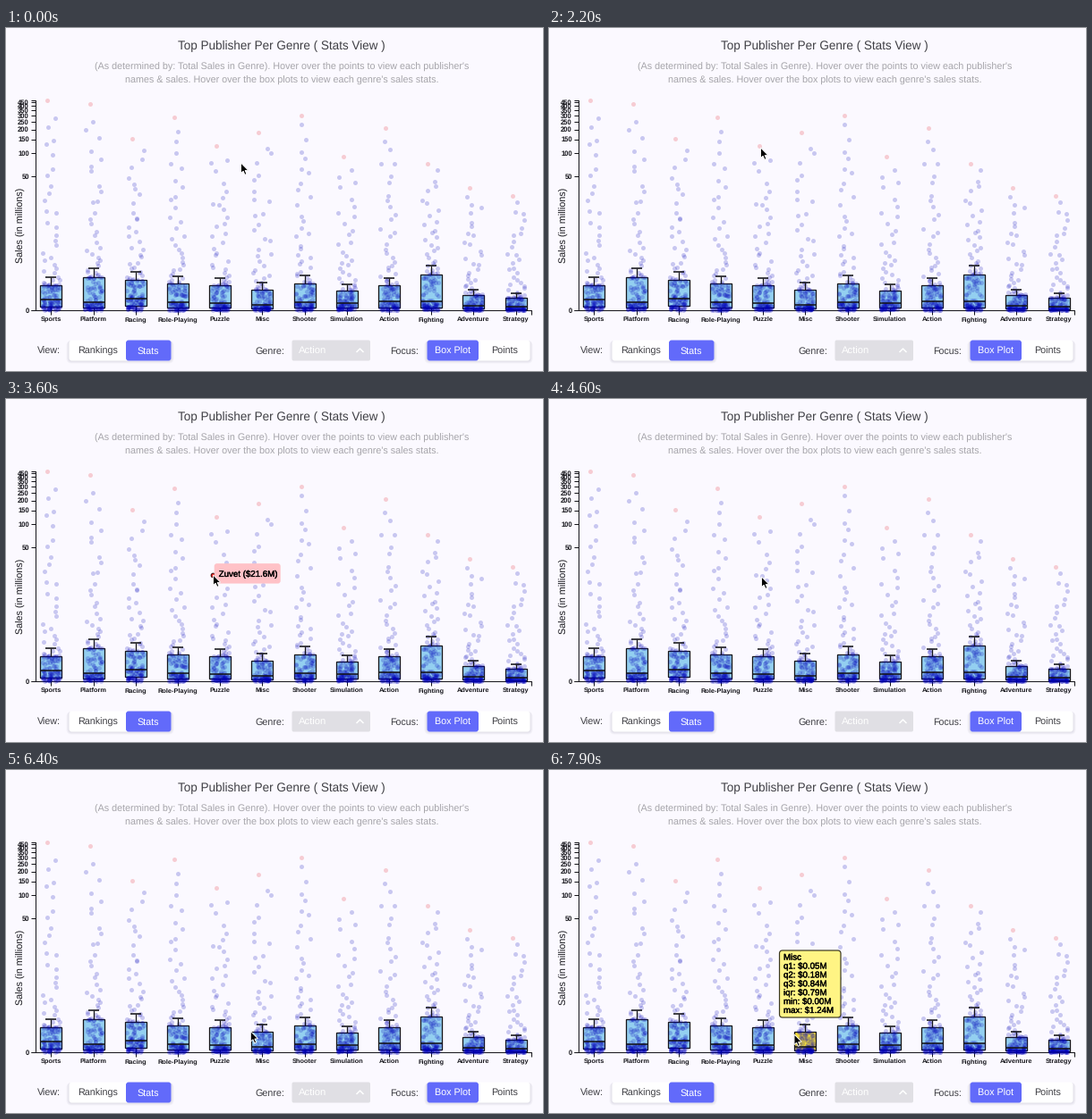
These frames come from a looping animation (600x384 px, 8 s). A matplotlib script:

```python
import numpy as np
import matplotlib.pyplot as plt
from matplotlib.animation import FuncAnimation
from matplotlib.patches import FancyBboxPatch, Polygon, Rectangle
from matplotlib.patheffects import Normal, Stroke

W, H, DPI = 600, 384, 100
PX = 72 / DPI
STEP, FRAMES = 100, 80
BG, INK, DARK = "#fbf9ff", "#3f3f44", "#15151a"
ACCENT, SKY, YELLOW = "#626afa", "#93cff0", "#f2dc3c"
AXIS_X, AXIS_Y = 32.5, 315.5

plt.rcParams.update({"font.family": "Liberation Sans", "text.hinting": "none"})
fig = plt.figure(figsize=(W / DPI, H / DPI), dpi=DPI, facecolor=BG)
ax = fig.add_axes([0, 0, 1, 1])
ax.set(xlim=(0, W), ylim=(H, 0))
ax.axis("off")


def text(x, y, s, size=10.75, color=INK, ha="left", medium=False, **kw):
    t = ax.text(x, y, s, fontsize=size * PX, color=color, ha=ha,
                va=kw.pop("va", "baseline"), **kw)
    if medium:
        t.set_path_effects([Stroke(linewidth=0.25, foreground=color), Normal()])
    return t


def panel(x0, y0, x1, y1, color, r=3, edge="none", lw=0.0, **kw):
    style = f"round,pad=0,rounding_size={r}"
    return ax.add_patch(FancyBboxPatch((x0, y0), x1 - x0, y1 - y0, boxstyle=style,
                                       fc=color, ec=edge, lw=lw * PX, **kw))


def line(xs, ys, color=DARK, lw=1.0, z=2):
    ax.plot(xs, ys, color=color, lw=lw * PX, zorder=z, solid_capstyle="butt")


def dots(xs, ys, rgb):
    ax.scatter(xs, ys, s=(5 * PX) ** 2, fc=(*rgb, 0.2), lw=0, zorder=5)


def y_of(sales):
    return 316 - 38.15 * np.log1p(sales)


# Sales in millions: median, third quartile, leading publisher
GENRES = {
    "Sports": (0.37, 1.11, 472), "Platform": (0.27, 1.64, 425),
    "Racing": (0.42, 1.41, 152), "Role-Playing": (0.28, 1.17, 287),
    "Puzzle": (0.23, 1.06, 124.9), "Misc": (0.18, 0.84, 183),
    "Shooter": (0.25, 1.20, 302), "Simulation": (0.23, 0.80, 90),
    "Action": (0.30, 1.08, 209), "Fighting": (0.30, 1.85, 72.6),
    "Adventure": (0.14, 0.58, 35.7), "Strategy": (0.125, 0.44, 27.3),
}
PER_QUARTER = 32
BLUE, RED = (0, 0, 0.72), (0.9, 0.1, 0.15)


def draw_header():
    text(308, 24.5, "Top Publisher Per Genre ( Stats View )", 13.55, ha="center")
    text(308, 46.6, "(As determined by: Total Sales in Genre). Hover over the points "
         "to view each publisher's", 10.7, "#a6a5aa", "center")
    text(308, 61.6, "names & sales. Hover over the box plots to view each genre's "
         "sales stats.", 10.7, "#a6a5aa", "center")


def draw_axes():
    left = AXIS_X - 5
    line([left, AXIS_X, AXIS_X, left], [80.5, 80.5, AXIS_Y, AXIS_Y])
    line([AXIS_X, 587, 587], [AXIS_Y, AXIS_Y, AXIS_Y + 5])
    for sales in range(0, 451, 50):
        y = y_of(sales)
        line([left, AXIS_X], [y, y])
        text(left - 1.7, y + 2.7, str(sales), 7.6, DARK, "right", weight="bold")
    text(17, 221, "Sales (in millions)", 10.7, DARK, "center", rotation=90, va="center")


def draw_box(cx, median, q3):
    """Quartile box; the whisker reaches half an IQR above it."""
    q1 = 0.3 * median
    top, hi, mid, lo = y_of(np.array([1.5 * q3 - 0.5 * q1, q3, median, q1]))
    line([cx, cx], [top, hi], lw=1.3, z=5.5)
    line([cx, cx], [lo, 316], lw=1.3)
    line([cx - 6, cx + 6], [top, top], lw=1.6, z=5.5)
    line([cx - 12, cx + 12], [mid, mid], lw=1.6, z=5.5)
    box = ax.add_patch(Rectangle((cx - 12, hi), 24, lo - hi, fc=SKY, ec=DARK,
                                 lw=1.3 * PX, zorder=3))
    return box, (hi, mid, lo, 316)


def draw_genres():
    rng = np.random.default_rng(11)
    boxes = {}
    for i, (name, (median, q3, lead)) in enumerate(GENRES.items()):
        cx = 50.3 + 47.2 * i
        line([cx, cx], [AXIS_Y, AXIS_Y + 5])
        text(cx, 328.3, name, 7.4, DARK, "center", weight="bold")
        boxes[name], rows = draw_box(cx, median, q3)

        # A quarter of the points per quartile, thinning out towards the leader
        u = (np.arange(PER_QUARTER) + rng.random(PER_QUARTER)) / PER_QUARTER
        ys = [rows[0] - (rows[0] - y_of(lead)) * 0.95 * u ** 2.1]
        ys += [rng.uniform(a, b, PER_QUARTER) for a, b in zip(rows, rows[1:])]
        dots(cx + rng.uniform(-10, 10, 4 * PER_QUARTER), np.concatenate(ys), BLUE)
        dots([cx - 4], [y_of(lead)], RED)
    return boxes


def toggle(x0, x1, split, left, right, left_on):
    for d in (1, 2, 3):
        panel(x0 - d, 350, x1 + d, 372.5 + d, (0.2, 0.2, 0.3, 0.04), 3 + d)
    panel(x0, 349.5, x1, 372.5, "white")
    a, b = (x0, split) if left_on else (split, x1)
    panel(a, 349.5, b, 372.5, ACCENT)
    for s, u, v, on in ((left, x0, split, left_on), (right, split, x1, not left_on)):
        text((u + v) / 2, 364.8, s, color="white" if on else INK, ha="center")


def draw_controls():
    text(34.5, 365, "View:")
    toggle(70.5, 184.5, 134, "Rankings", "Stats", False)
    text(278, 365, "Genre:")
    panel(319.5, 349.5, 407, 372.5, "#e0dfe4", 2)
    text(327, 364.8, "Action", 11.2, "white")
    line([391.5, 395.5, 399.5], [363, 359, 363], "white", 1.5)
    text(429, 365, "Focus:", 10.6)
    toggle(470.5, 585.5, 528, "Box Plot", "Points", True)


def point_tip(x, y, width, label):
    dot, = ax.plot([x], [y], "o", ms=4.8 * PX, mfc="#e8201c", mec="#2a0808",
                   mew=0.9 * PX, zorder=6)
    left, top = x + 1.7, y - 12.9
    back = panel(left, top, left + width, top + 22.4, "#ffc2c7", 3, zorder=7)
    words = text(left + 5, top + 14.8, label, 9.7, "black", medium=True, zorder=8)
    return [dot, back, words]


def box_tip():
    rows = ["Misc", "q1: $0.05M", "q2: $0.18M", "q3: $0.84M",
            "iqr: $0.79M", "min: $0.00M", "max: $1.24M"]
    back = panel(257.5, 202, 326, 277, "#fff484", 3.5, "#3a3720", 1.2, zorder=7)
    return [back] + [text(262, 212.6 + 9.9 * i, s, 9.7, "black", medium=True, zorder=8)
                     for i, s in enumerate(rows)]


draw_header()
draw_axes()
boxes = draw_genres()
draw_controls()

LEADER, RUNNER_UP = (235.1, y_of(124.9)), (231, y_of(21.6))
dots(*RUNNER_UP, BLUE)

# Visible span in ms and artists
TIPS = [
    (800, 2100, point_tip(*LEADER, 101, "Velmorka ($124.9M)")),
    (3200, 4400, point_tip(*RUNNER_UP, 74, "Zuvet ($21.6M)")),
    (6600, 8000, box_tip()),
]

# Cursor rests: arrival and departure in ms, tip position
STOPS = [(0, 200, 262.5, 151), (800, 1900, 236.5, 131), (2200, 2500, 236.5, 134),
         (3200, 4200, 231.5, 197), (4600, 5100, 237.5, 199),
         (6300, 6400, 273.3, 292.5), (6800, 8000, 274, 296)]
ARROW = np.array([(0, 0), (0, 11.6), (2.6, 9.2), (4.4, 13.3),
                  (6.4, 12.4), (4.6, 8.5), (8.2, 8.3)])
cursor = ax.add_patch(Polygon(ARROW, fc="black", ec="white", lw=0.9 * PX, zorder=9))


def cursor_at(ms):
    pos = np.array(STOPS[0][2:])
    for (_, leave, *a), (arrive, _, *b) in zip(STOPS, STOPS[1:]):
        u = np.clip((ms - leave) / (arrive - leave), 0, 1)
        pos = pos + np.subtract(b, a) * u * u * (3 - 2 * u)
    return pos


def update(frame):
    ms = frame * STEP
    cursor.set_xy(ARROW + cursor_at(ms))
    for start, end, artists in TIPS:
        for artist in artists:
            artist.set_visible(start <= ms < end)
    boxes["Misc"].set_facecolor(YELLOW if ms >= TIPS[-1][0] else SKY)
    return []


anim = FuncAnimation(fig, update, frames=FRAMES, interval=STEP,
                     init_func=lambda: update(0), repeat=True, repeat_delay=0)
plt.show()
```
